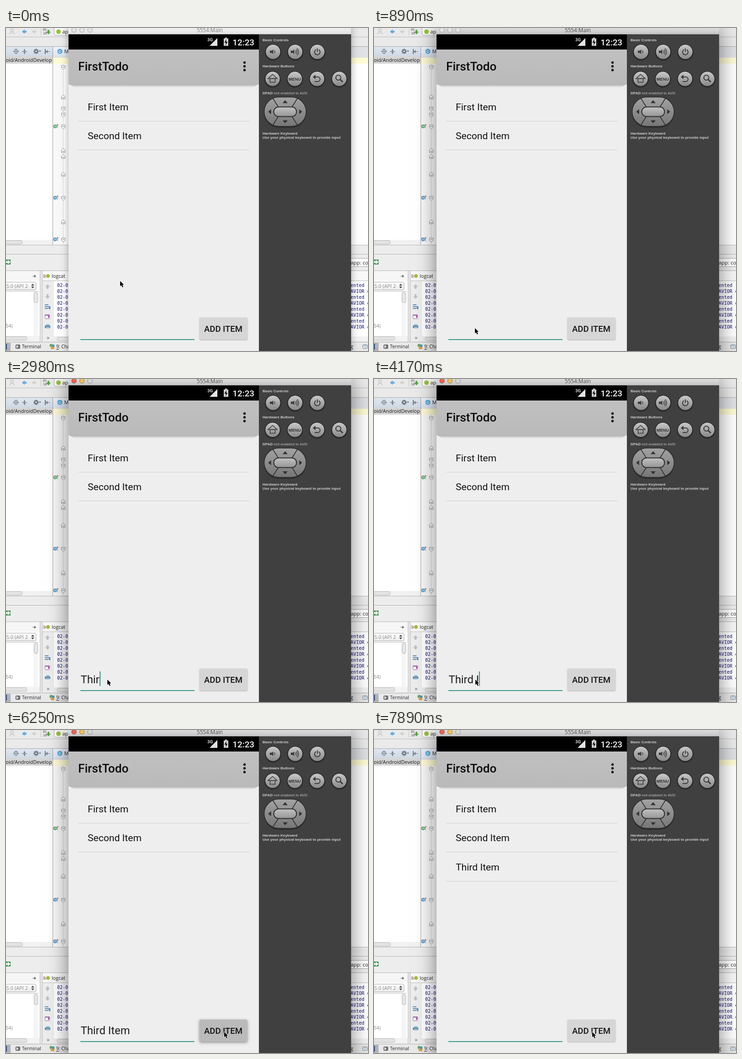
Recreate the animation shown at these times as an HTML page with a canvas. Size 793 px wide and 706 px high, loop 8 s.

```html
<!DOCTYPE html>
<html lang="en">
<head>
<meta charset="utf-8">
<title>Todo app in an emulator</title>
<style>
html, body { margin: 0; width: 100%; height: 100%; overflow: hidden; background: #fff; }
canvas { display: block; }
</style>
</head>
<body>
<canvas id="stage" width="793" height="706"></canvas>
<script>
const ctx = document.getElementById('stage').getContext('2d');
const ROBOTO = 'Roboto, sans-serif';
const UI = '"Open Sans", "Noto Sans", sans-serif';
const HELV = '"Liberation Sans", Arial, sans-serif';
const MONO = '"DejaVu Sans Mono", monospace';
const TEAL = '#3c978e', ICON = '#3a3a3a', EDGE = '#b4b4b4';

const LOOP = 8000, STEP = 148.75;
const FOCUS = 890, CLICK = 1120, PRESS = 6240, TAP = 6260, ADDED = 6540, RELEASED = 6840;
const ENTRY = 'Third Item';
const BURSTS = [['Third', 2325], [' ', 3840], ['Item', 4160]];
const KEYS = BURSTS.flatMap(([word, at]) => [...word].map((_, i) => at + i * 185));
const RESETS = [CLICK, ...KEYS, TAP];
const ROUTE = [
  { t: 0, x: 250, y: 553 }, { t: 740, x: 221, y: 656 }, { t: 1190, x: 222, y: 657 },
  { t: 5200, x: 222, y: 657 }, { t: 5350, x: 290, y: 635 },
  { t: 5650, x: 466, y: 671 }, { t: 5940, x: 478, y: 660 }
];

function rect(x, y, w, h, fill) {
  ctx.fillStyle = fill;
  ctx.fillRect(x, y, w, h);
}

function fade(y0, y1, a, b) {
  const g = ctx.createLinearGradient(0, y0, 0, y1);
  g.addColorStop(0, a);
  g.addColorStop(1, b);
  return g;
}

function paint(fill, stroke, width = 1) {
  if (fill) { ctx.fillStyle = fill; ctx.fill(); }
  if (stroke) { ctx.strokeStyle = stroke; ctx.lineWidth = width; ctx.stroke(); }
}

function round(x, y, w, h, r, fill, stroke, width) {
  ctx.beginPath();
  ctx.roundRect(x, y, w, h, r);
  paint(fill, stroke, width);
}

function arc(x, y, r, from, to, color, width) {
  ctx.beginPath();
  ctx.arc(x, y, r, from, to);
  paint(null, color, width);
}

function disc(x, y, r, fill, stroke, width) {
  ctx.beginPath();
  ctx.arc(x, y, r, 0, Math.PI * 2);
  paint(fill, stroke, width);
}

function poly(x, y, pts, fill, stroke, width) {
  ctx.beginPath();
  for (const [dx, dy] of pts) ctx.lineTo(x + dx, y + dy);
  ctx.closePath();
  paint(fill, stroke, width);
}

function line(x0, y0, x1, y1, color, width = 1) {
  ctx.beginPath();
  ctx.moveTo(x0, y0);
  ctx.lineTo(x1, y1);
  paint(null, color, width);
}

// Triangle centred on x, y; turn counts quarter turns clockwise from "right".
function tri(x, y, r, turn, fill) {
  ctx.save();
  ctx.translate(x, y);
  ctx.rotate(turn * Math.PI / 2);
  poly(0, 0, [[r / 2, 0], [-r / 2, -r * .85], [-r / 2, r * .85]], fill);
  ctx.restore();
}

function arrow(x, y, turn, color) {
  const a = turn * Math.PI / 2, c = Math.cos(a), s = Math.sin(a);
  line(x - 5 * c, y - 5 * s, x + c, y + s, color, 4);
  tri(x + 2 * c, y + 2 * s, 6, turn, color);
}

function text(s, x, y, font, color, align = 'left') {
  ctx.font = font;
  ctx.fillStyle = color;
  ctx.textAlign = align;
  ctx.fillText(s, x, y);
}

const label = (s, x, y, align, size = 10.7, color = '#222') =>
  text(s, x, y, size + 'px ' + UI, color, align);

function scrollbar(x, y, w, thumb) {
  rect(x, y, w, 11, '#f2f2f2');
  round(x - 5, y + 1.5, thumb, 8, 4, '#e3e3e3', '#b9b9b9');
}

function foldMark(y, up) {
  const s = up ? -1 : 1;
  poly(125.5, y, [[-4, -4 * s], [4, -4 * s], [4, s], [0, 5 * s], [-4, s]], '#fff', '#8c8c8c');
  line(123.5, y - s + .5, 127.5, y - s + .5, '#777');
}

function gutterIcon(y, color) {
  disc(107.5, y, 4, color);
  disc(107.5, y, 1.6, null, '#fff');
  line(113, y + 4, 113, y - 4, '#d0675c');
  tri(113, y - 4, 3, 3, '#d0675c');
}

function topBars() {
  rect(0, 0, 793, 41, '#eaeaea');
  rect(0, 19, 793, 1, '#bcbcbc');
  rect(0, 40, 793, 1, '#a9a9a9');
  disc(13, 5, 3, null, '#c6c6c6', 1.5);
  arc(13, 14, 5, Math.PI, 0, '#c6c6c6', 1.5);
  arrow(40, 8, 2, '#62a8e0');
  arrow(62, 8, 0, '#d2d2d2');
  rect(76, 1, 1, 15, '#c8c8c8');
  for (const [i, bits] of ['01', '10'].entries()) text(bits, 81, 6 + i * 8, '7px ' + MONO, '#444');
  arrow(93, 9, 1, '#58a545');
  round(105.5, -4, 40, 20, 3, '#f8f8f8', '#adadad');
  disc(115, 8, 5, '#9cc035');
  label('app', 123.5, 12);
}

function projectPane() {
  const ink = '#66707c';
  rect(0, 41, 102, 21, fade(41, 62, '#dfe6ee', '#cfd9e5'));
  rect(0, 62, 102, 412, '#fff');
  rect(0, 62, 102, 16, '#d6d6d6');
  label('oid/AndroidDevelop', 100.5, 74, 'right', 10.8, '#151515');
  disc(22, 51, 4.5, null, ink, 1.2);
  line(22, 45, 22, 57, ink);
  line(16, 51, 28, 51, ink);
  line(35, 51.5, 46, 51.5, ink);
  for (const s of [-1, 1]) {
    tri(40.5, 51.5 + 3 * s, 3, 2 - s, ink);
    line(40.5, 51.5, 40.5, 51.5 + 6 * s, ink);
  }
  disc(66, 51, 3.2, null, ink, 2.5);
  for (let i = 0; i < 8; i++) arc(66, 51, 5, i * .785 - .15, i * .785 + .15, ink, 2);
  tri(74.5, 51, 3, 1, ink);
  rect(85, 46, 2, 11, ink);
  tri(89, 51.5, 4, 2, ink);
  rect(91, 51, 5, 1, ink);
  scrollbar(0, 463, 102, 41);
}

function editor() {
  rect(102, 41, 691, 24, '#dfe1e4');
  rect(103, 41, 40, 21, fade(41, 62, '#eef3f9', '#d9e4f0'));
  disc(118, 51, 5.5, '#55a6d4');
  text('C', 118, 54, 'bold 8px ' + HELV, '#fff', 'center');
  label('Main', 127.5, 55);
  rect(102, 65, 691, 409, '#fff');
  rect(103, 65, 22, 409, '#f8f8f8');
  rect(103, 65, 690, 13, '#fffbd3');
  rect(102, 41, 1, 433, '#9b9b9b');
  ctx.setLineDash([1, 1]);
  line(125.5, 78, 125.5, 474, EDGE);
  ctx.setLineDash([]);
  // Code lines are 13 px apart; marks sit on a few of them.
  for (const row of [0, 7, 8, 10, 22, 29]) foldMark(86 + row * 13, false);
  for (const row of [5, 14, 15, 18, 26]) foldMark(86 + row * 13, true);
  for (const row of [10, 22, 29]) gutterIcon(85 + row * 13, row > 10 ? '#4a94c4' : '#4fa567');
}

function devicePane() {
  rect(0, 531, 75, 22, '#f6f6f6');
  rect(0, 553, 75, 122, '#fff');
  line(58, 542.5, 65, 542.5, '#6a6a6a');
  tri(64, 542.5, 4, 0, '#6a6a6a');
  round(-6, 555.5, 72, 17, 3, fade(555, 573, '#fff', '#ebebeb'), '#a6a6a6');
  label('5.0 (API 2', 48, 568, 'right', 11, '#8a8a8a');
  for (const s of [-1, 1]) tri(58.5, 564 + 3 * s, 4, 2 - s, '#444');
  rect(0, 575, 71, 1, '#b8b8b8');
  rect(60, 576, 11, 98, '#f5f5f5');
  round(61.5, 577.5, 8, 23, 4, '#e6e6e6', '#b8b8b8');
  label('54)', 14.5, 655, 'right', 10.7, '#858585');
  scrollbar(0, 673, 75, 51);
  rect(74, 531, 6, 154, '#bcbcbc');
  rect(75, 531, 4, 154, '#e6e6e6');
}

function logPane() {
  rect(80, 531, 713, 22, '#f8f8f8');
  rect(80, 552, 713, 1, '#bdbdbd');
  rect(105, 553, 688, 121, '#fff');
  scrollbar(117, 674, 676, 500);
  for (let i = 0; i < 3; i++) rect(82 + i * 2, 538 + i, 1, 8 - i, '#b05fa0');
  disc(92, 542, 4, '#9cc035');
  label('logcat', 100, 546);
  for (let i = 0; i < 8; i++) {
    const y = 566 + i * 13;
    text('02-0', 112, y, '10px ' + MONO, '#10107c');
    text(i % 2 ? 'AVIOR c' : 'ented', 755, y, '10px ' + MONO, '#10107c');
  }
  arrow(91, 565, 3, '#bfbfbf');
  arrow(91, 587, 1, '#bfbfbf');
  for (let i = 0; i < 3; i++) rect(85, 604 + i * 4, 8 + (i % 2) * 4, 2, '#5b8fb5');
  tri(95, 612, 4, 2, '#3c7fb4');
  round(85.5, 626.5, 10, 9, 1, '#fff', '#8b6fa0');
  rect(85, 626, 11, 3, '#a583bd');
  tri(94, 631, 4, 0, '#a94fa0');
  round(85.5, 650.5, 11, 5, 1, '#6f9fbd', '#477b9d');
  for (const y of [647, 654]) rect(88, y, 7, 3, '#a9c8dd');
  label('»', 89, 681, 'left', 13, '#666');
}

function lowerPane() {
  rect(0, 474, 793, 232, '#ededed');
  for (const y of [474, 494, 530]) rect(0, y, 793, 1, EDGE);
  rect(0, 506, 10, 11, '#4c9659');
  arrow(5, 511.5, 0, '#e8f5e8');
  round(700.5, 503.5, 110, 18, 3, '#fff', '#a5a5a5');
  label('app: co', 755, 517, 'left', 11.4);
  devicePane();
  logPane();
  rect(0, 685, 793, 21, '#e9e9e9');
  rect(0, 686, 793, 1, EDGE);
  rect(0, 688, 10, 18, '#b2b2b2');
  rect(0, 690, 2, 13, '#2a4f8f');
  round(21.5, 692.5, 9, 8, 1, '#767676', '#555');
  tri(25, 696.5, 4, 0, '#fff');
  label('Terminal', 35, 700, 'left', 10.3);
  disc(99, 694, 3.5, '#5fa84e');
  rect(98, 695, 8, 7, '#e0a23e');
  rect(101, 692, 5, 5, '#4e8ec6');
  label('9: Changes', 110, 700, 'left', 10.3);
  rect(110, 702, 6, 1, '#222');
  label('Event Log', 760.5, 700, 'right', 10.3);
  round(781.5, 692.5, 10, 8, 1, '#fff', '#666');
  for (const y of [694, 697]) rect(783, y, 7, 1, '#4e8ec6');
}

function windowFrame(t) {
  const active = t >= FOCUS, lit = t >= CLICK;
  ctx.save();
  ctx.shadowColor = active ? 'rgba(0,0,0,.5)' : 'rgba(0,0,0,.34)';
  ctx.shadowBlur = active ? 42 : 16;
  ctx.shadowOffsetY = active ? 10 : 4;
  rect(137, -9, 619, 800, '#404040');
  ctx.restore();
  rect(137, 0, 619, 14, active ? fade(0, 14, '#dcdcdc', '#c4c4c4') : fade(0, 14, '#f0f0f0', '#e2e2e2'));
  rect(137, 13, 619, 1, '#a2a2a2');
  label('5554:Main', 446.5, 9, 'center', 11.7, active ? '#4c4c4c' : '#7c7c7c');
  ['#ee6055', '#f3c04f', '#d8d8d8'].forEach((c, i) =>
    disc(149 + i * 17.5, 4, 5.3, lit ? c : '#e3e3e3', lit ? 'rgba(0,0,0,.35)' : '#a2a2a2'));
}

function knob(x, y) {
  disc(x, y + 1.5, 18, 'rgba(0,0,0,.28)');
  disc(x, y, 16.3, fade(y - 16, y + 16, '#c9c9c9', '#868686'), '#2c2c2c', 1.5);
  disc(x, y, 15, null, 'rgba(255,255,255,.22)');
}

function speaker(x, y, waves) {
  rect(x - 7, y - 2.5, 4, 5, ICON);
  tri(x - 2.5, y, 6, 2, ICON);
  for (let i = 1; i <= waves; i++) arc(x, y, 1 + 3 * i, -.85, .85, ICON, 1.4);
}

function dpad(x, y) {
  ctx.save();
  round(x - 46, y - 30, 92, 65, 32, 'rgba(0,0,0,.3)');
  round(x - 46, y - 32, 92, 64, 32, fade(y - 32, y + 32, '#a3a3a3', '#767676'), '#2a2a2a', 1.6);
  ctx.clip();
  for (const s of [-1, 1]) for (const v of [-1, 1])
    line(x + s * 14, y + v * 9, x + s * 30, y + v * 34, '#333', 1.8);
  ctx.restore();
  round(x - 25, y - 10.5, 50, 21, 10.5, fade(y - 10, y + 10, '#c0c0c0', '#979797'), '#303030', 2);
  for (let turn = 0; turn < 4; turn++) {
    const a = turn * Math.PI / 2;
    tri(x + 34 * Math.cos(a), y + 22 * Math.sin(a), 6.5, turn, '#333');
  }
}

function controls() {
  const small = (s, x, y, color = '#cfcfcf') => text(s, x, y, 'bold 8.1px ' + HELV, color);
  small('Basic Controls', 562, 29);
  small('Hardware Buttons', 562, 86);
  small('DPAD', 562, 145);
  small('not enabled in AVD', 586.5, 145, '#a2a2a2');
  small('Hardware Keyboard', 562, 233);
  small('Use your physical keyboard to provide input', 562, 242);

  for (let i = 0; i < 4; i++) {
    if (i < 3) knob(585 + i * 48.5, 52);
    knob(584 + i * 48.7, 111);
  }
  speaker(585, 52, 1);
  speaker(631, 52, 3);
  arc(682, 52.5, 6, -1, Math.PI + 1, ICON, 2);
  line(682, 44.5, 682, 52, ICON, 2);
  // Home, menu, back, search
  poly(584, 106.5, [[0, -5], [10, 4], [-10, 4]], null, ICON, 1.6);
  round(578.5, 110.5, 11, 8, 0, null, ICON, 1.6);
  text('MENU', 632.5, 114.5, 'bold 9.3px ' + HELV, '#333', 'center');
  arc(683, 112, 5, -Math.PI / 2, Math.PI / 2, ICON, 2);
  for (const y of [107, 117]) line(676, y, 683, y, ICON, 2);
  tri(675, 107, 6, 2, ICON);
  disc(728, 108.5, 5.5, null, ICON, 2);
  line(732, 112.5, 737.5, 118, ICON, 3);
  dpad(611.5, 183);
}

function statusBar() {
  rect(137, 14, 417, 33, '#000');
  text('3G', 441, 29, '500 9.5px ' + ROBOTO, '#fff');
  poly(463, 39, [[0, 0], [0, -17], [-17, 0]], '#e4e4e4');
  rect(480, 21, 4, 2, '#d2d2d2');
  rect(477, 23, 10, 16, '#d2d2d2');
  poly(482, 31, [[1, -7], [-3.5, 1], [0, 1]], '#111');
  poly(482, 31, [[-1, 7], [3.5, -1], [0, -1]], '#111');
  text('12:23', 544, 37.5, '500 18.8px ' + ROBOTO, '#f4f4f4', 'right');
}

function button(t) {
  const pressed = t >= PRESS && t < RELEASED, held = pressed && t < ADDED;
  ctx.save();
  ctx.shadowColor = pressed ? 'rgba(0,0,0,.42)' : 'rgba(0,0,0,.28)';
  ctx.shadowBlur = pressed ? 6 : 3;
  ctx.shadowOffsetY = pressed ? 2 : 1;
  round(424, 633, 104.5, 48, 2.5, held ? '#b9bab9' : pressed ? '#c8c9c8' : '#d6d6d6');
  ctx.restore();
  if (held) disc(478, 660, 9, 'rgba(0,0,0,.06)');
  text('ADD ITEM', 476, 663.7, '500 18.5px ' + ROBOTO, '#141414', 'center');
}

function entryField(t) {
  const typed = t < ADDED ? ENTRY.slice(0, KEYS.filter(k => k <= t).length) : '';
  text(typed, 163.5, 664.5, '23.8px ' + ROBOTO, '#1c1c1c');
  rect(163, 680, 250, 2, TEAL);
  // The caret blinks twice a second, restarting at each key or tap.
  const reset = RESETS.filter(r => r <= t).pop();
  if (reset && (t - reset) % 1000 < 500)
    rect(Math.round(163.5 + ctx.measureText(typed).width), 639, 2, 32, TEAL);
}

function phone(t) {
  rect(137, 14, 417, 692, '#eeeeee');
  statusBar();
  poly(137, 122, [[0, 0], [417, 0], [404, 8], [13, 8]], fade(122, 130, 'rgba(0,0,0,.3)', 'rgba(0,0,0,0)'));
  rect(137, 47, 417, 76, fade(47, 123, '#c0c0c0', '#bababa'));
  text('FirstTodo', 158, 93, '500 26.2px ' + ROBOTO, '#0c0c0c');
  for (let i = -1; i < 2; i++) disc(522.5, 83.7 + i * 8.2, 2.7, '#111');
  const rows = ['First Item', 'Second Item'];
  if (t >= ADDED) rows.push(ENTRY);
  rows.forEach((item, i) => {
    const y = Math.round(203 + i * 63.4);
    text(item, 179, y - 23, '21.1px ' + ROBOTO, '#111');
    rect(158, y, 375, 1, '#d0d0d0');
  });
  entryField(t);
  button(t);
}

function pointer(t) {
  const i = ROUTE.filter(p => p.t <= t).length - 1;
  const a = ROUTE[i], b = ROUTE[i + 1] || a;
  const p = b === a ? 0 : (t - a.t) / (b.t - a.t), e = p * p * (3 - 2 * p);
  const x = Math.round(a.x + (b.x - a.x) * e), y = Math.round(a.y + (b.y - a.y) * e);
  const shape = [[0, 0], [0, 11.5], [2.7, 9.2], [4.7, 13.8], [6.8, 12.9], [4.9, 8.4], [8.2, 8.1]];
  ctx.lineJoin = 'round';
  poly(x, y, shape, null, '#fff', 1.4);
  poly(x, y, shape, '#000');
  ctx.lineJoin = 'miter';
}

function draw(now) {
  // Small lead absorbs rounding in the refresh times.
  const t = Math.floor((now + 5) / STEP) * STEP + 4;
  topBars();
  projectPane();
  editor();
  lowerPane();
  windowFrame(t);
  controls();
  phone(t);
  pointer(t);
}

const start = performance.now();
function tick() {
  draw((performance.now() - start) % LOOP);
  requestAnimationFrame(tick);
}
tick();
</script>
</body>
</html>
```
